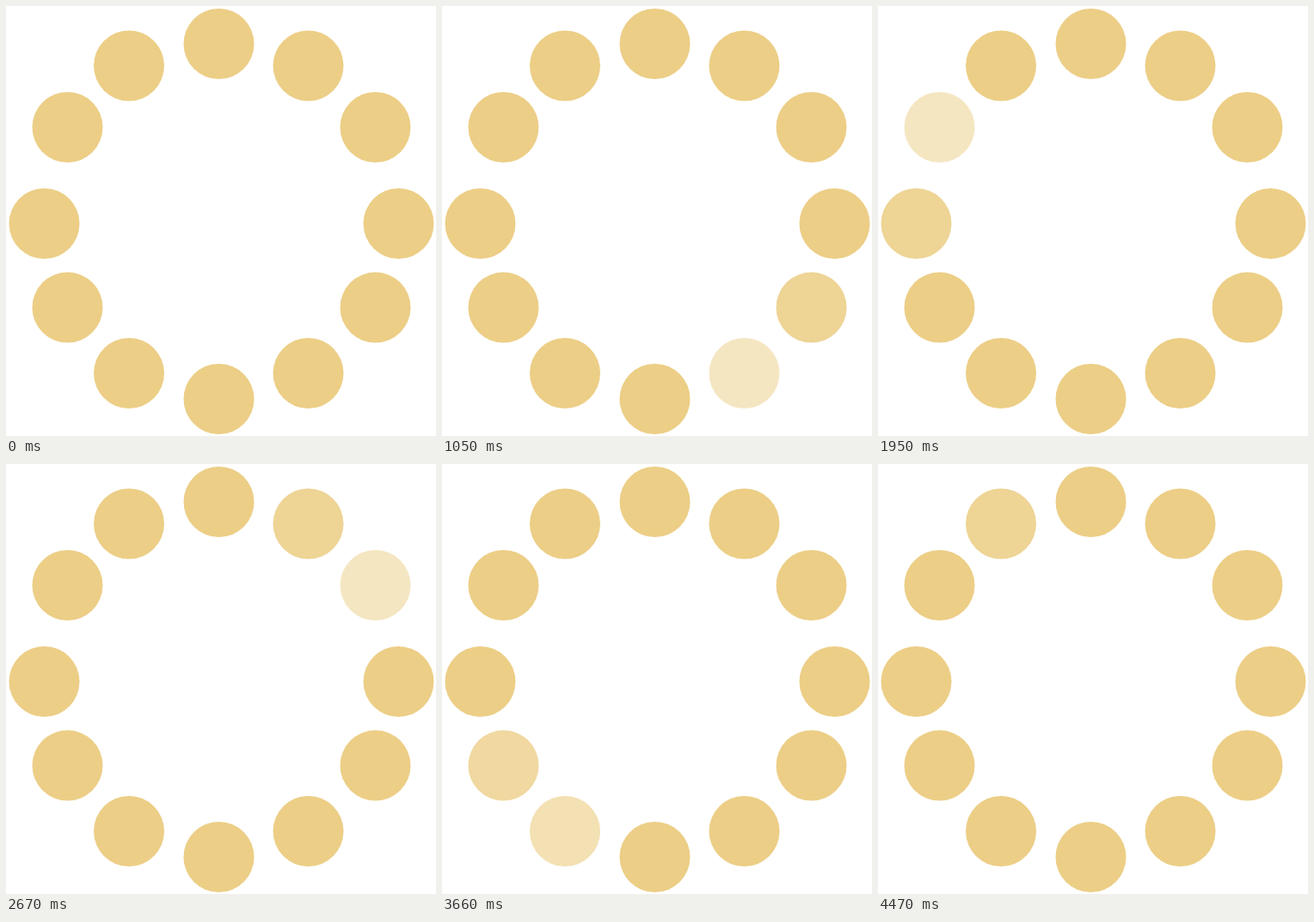
An HTML page for the animation above (4.5 s loop, 500 px wide and 500 px high).

```html
<!DOCTYPE html>
<html lang="en">
<head>
<meta charset="utf-8">
<title>Ring of dots</title>
<style>
  html, body { margin: 0; width: 100%; height: 100%; overflow: hidden; background: #fff; }
  svg { display: block; width: 100%; height: 100%; fill: #ecce86; }
</style>
</head>
<body>
<svg viewBox="0 0 500 500"></svg>
<script>
const LOOP = 4500, BEAT = 180, PULSES = 24, DOTS = 12;
// The ring sits on seven columns and seven rows
const columns = [44.5, 71.5, 143, 247.5, 351.5, 429.5, 456.5];
const rows = [44, 69.5, 141, 253, 350.6, 427, 457];

// Counts 0 to 6 and back to 0 along the ring
const fold = i => Math.min(i % DOTS, DOTS - i % DOTS);

const svg = document.querySelector("svg");
const dots = Array.from({ length: DOTS }, (_, i) => {
  const dot = document.createElementNS("http://www.w3.org/2000/svg", "circle");
  dot.setAttribute("cx", columns[fold(i + 3)]);
  dot.setAttribute("cy", rows[fold(i)]);
  dot.setAttribute("r", 41);
  return svg.appendChild(dot);
});

// Each beat has three steps, starting 60, 90 and 150 ms into it
function stepAt(time) {
  const phase = time % BEAT;
  return 3 * Math.floor(time / BEAT) - 1 + (phase >= 60) + (phase >= 90) + (phase >= 150);
}

// A pulse fades to half in three steps, then back a little more slowly
function pulse(step) {
  if (step < 0 || step > 5) return 1;
  return 0.5 + Math.abs(step - 2) * (step < 2 ? 0.14 : 0.125);
}

function draw(now) {
  const step = stepAt(now % LOOP);
  const opacity = Array(DOTS).fill(1);
  for (let k = 0; k < PULSES; k++) opacity[k % DOTS] *= pulse(step - 3 * k);
  dots.forEach((dot, i) => dot.setAttribute("fill-opacity", opacity[i]));
}

const start = performance.now();
function tick() {
  draw(performance.now() - start);
  requestAnimationFrame(tick);
}
tick();
</script>
</body>
</html>
```
